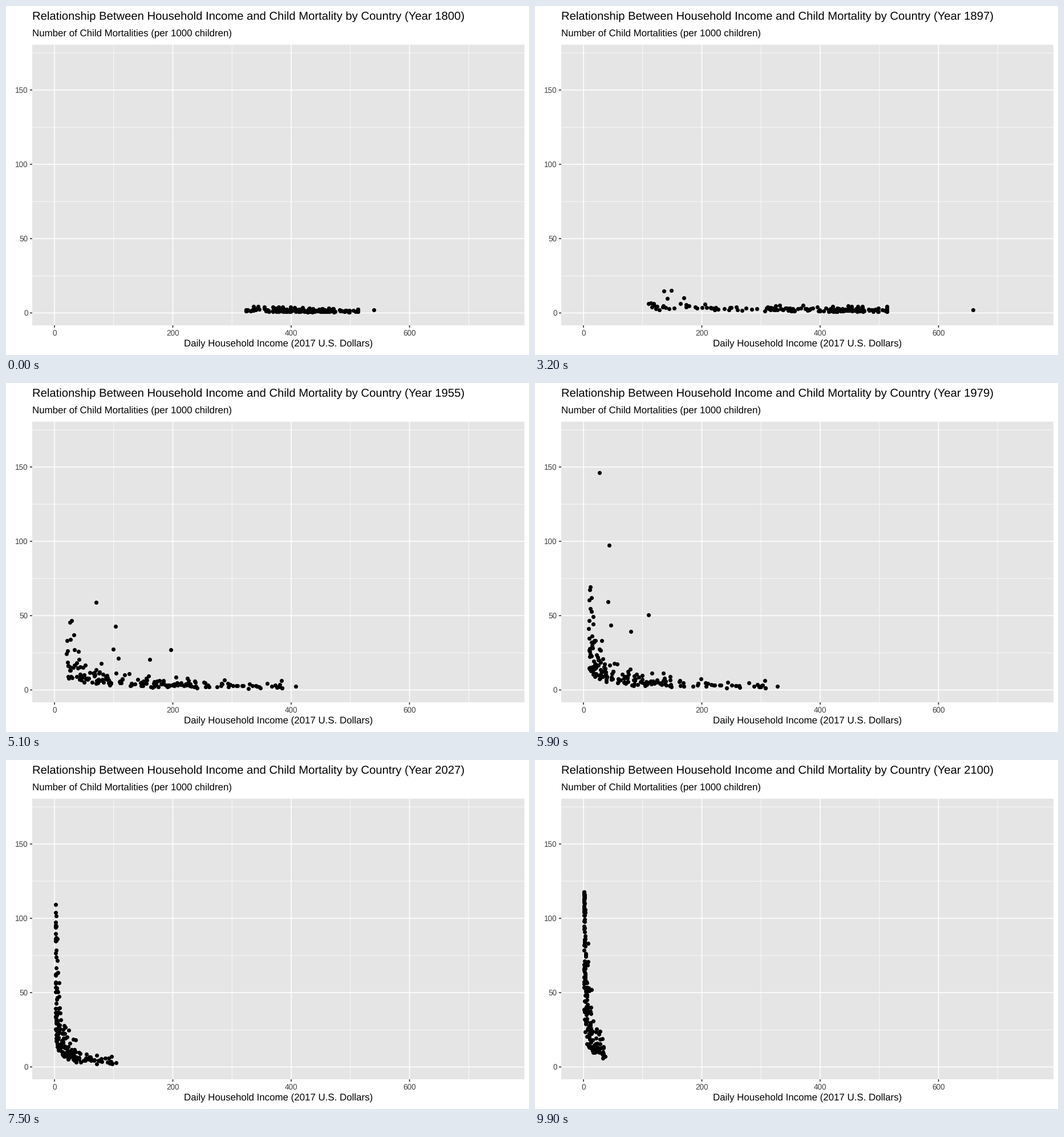
Animation of 917 by 611 pixels, one loop 10000 ms. Source, as a matplotlib script:

```python
import numpy as np
import matplotlib.pyplot as plt
from matplotlib.animation import FuncAnimation
from matplotlib.patches import Rectangle

W, H, DPI = 917, 611, 64
FRAMES, INTERVAL = 100, 100
LEFT, RIGHT, TOP, BOTTOM = 46, 909, 67.7, 559
COUNTRIES = 188

plt.rcParams["font.family"] = "Liberation Sans"
plt.rcParams["text.hinting"] = "none"

# Log decline of x since 1800 for four ranks, from the earliest to the latest
YEARS = [1800, 1848, 1897, 1930, 1979, 2027, 2100]
RANKS = [0, .2, .5, 1]
DECLINE = [
    [0, .35, 1.08, 1.92, 3.58, 5.37, 6.13],
    [0, .05, .22, .78, 2.81, 4.57, 5.43],
    [0, 0, 0, .28, 1.81, 3.47, 4.33],
    [0, 0, 0, .06, .50, 1.64, 2.70],
]
# y follows level * x ** -0.75 and flattens out towards a ceiling
LEVEL = [145, 155, 200, 230, 193, 111, 151]
POWER, CEILING, SPREAD = -.75, 118, .45
# Rank and log boost of the countries that boom around 1975
BOOMS = [(.24, 2.19), (.35, 2.26), (.375, 2.16), (.36, 1.62),
         (.39, 1.4), (.66, 2.19), (.555, 1.7)]

rng = np.random.default_rng(18)
rank = np.sort(rng.random(COUNTRIES))
rank[0], rank[-1] = 0, 1
start = 418 + 45 * np.clip(np.sort(rng.normal(size=COUNTRIES)), -2.1, 2.1)
start[-1] = 540
noise = np.clip(rng.normal(size=(2, COUNTRIES)), -1.9, 1.9)
epidemic = .3 * rng.random(COUNTRIES) ** 2
epidemic[-1] = .47
famine = np.zeros(COUNTRIES)
famine[-1] = .22
boom = np.zeros(COUNTRIES)
for r, boost in BOOMS:
    i = np.abs(rank - r).argmin()
    rank[i], boom[i], noise[:, i] = r, boost, 0


def bump(year, centre, width):
    return np.exp(-((year - centre) / width) ** 2)


def positions(year):
    decline = [np.interp(year, YEARS, row) for row in DECLINE]
    x = start * np.exp(-np.interp(rank, RANKS, decline))

    phase = (year - 1800) / 120
    drift = noise[0] * np.cos(phase) + noise[1] * np.sin(phase)
    y = np.interp(year, YEARS, LEVEL) * x ** POWER * np.exp(SPREAD * drift)
    y /= (1 + (y / CEILING) ** 4) ** .25
    y *= np.exp(boom * bump(year, 1975, 55))

    x *= 1 + epidemic * bump(year, 1918.2, 1.2) + famine * bump(year, 1897, 3)
    return x, y


def px(v):
    return v * 72 / DPI


def to_x(v):
    return 85 + 1.0375 * np.asarray(v)


def to_y(v):
    return 537.4 - 2.602 * np.asarray(v)


fig = plt.figure(figsize=(W / DPI, H / DPI), dpi=DPI, facecolor="white")
ax = fig.add_axes([0, 0, 1, 1])
ax.set_xlim(0, W)
ax.set_ylim(H, 0)
ax.axis("off")


def label(x, y, text, size, color="black", ha="left"):
    return ax.text(x, y, text, fontsize=px(size), color=color, ha=ha,
                   va="baseline")


def line(xs, ys, width, color="white"):
    ax.plot(xs, ys, color=color, lw=px(width), solid_capstyle="butt",
            snap=False)


ax.add_patch(Rectangle((LEFT, TOP), RIGHT - LEFT, BOTTOM - TOP,
                       facecolor="#e5e5e5", lw=0, snap=False))

for v in range(25, 200, 50):
    line([LEFT, RIGHT], [to_y(v)] * 2, .8)
for v in range(100, 800, 200):
    line([to_x(v)] * 2, [TOP, BOTTOM], .8)
for v in range(0, 200, 50):
    y = to_y(v)
    line([LEFT, RIGHT], [y, y], 1.6)
    line([LEFT - 4.1, LEFT], [y, y], 1.6, "#2b2b2b")
    label(38.8, y + 4.8, str(v), 13.5, "#404040", "right")
for v in range(0, 800, 200):
    x = to_x(v)
    line([x, x], [TOP, BOTTOM], 1.6)
    line([x, x], [BOTTOM, BOTTOM + 4.1], 1.6, "#2b2b2b")
    label(x, 577, str(v), 13.5, "#404040", "center")

TITLE = ("Relationship Between Household Income and Child Mortality "
         "by Country (Year {})")
title = label(LEFT, 23.6, TITLE.format(1800), 20.27)
label(LEFT, 52.8, "Number of Child Mortalities (per 1000 children)", 16.87)
label(477.5, 595.7, "Daily Household Income (2017 U.S. Dollars)", 16.87,
      ha="center")

dots, = ax.plot([], [], "o", color="black", ms=px(7.1), mew=0, snap=False,
                zorder=3)


def update(i):
    year = 1800 + 300 * i / (FRAMES - 1)
    x, y = positions(year)
    dots.set_data(to_x(x), to_y(y))
    title.set_text(TITLE.format(round(year)))
    return dots, title


anim = FuncAnimation(fig, update, frames=FRAMES, interval=INTERVAL,
                     repeat=True, repeat_delay=0)
plt.show()
```
